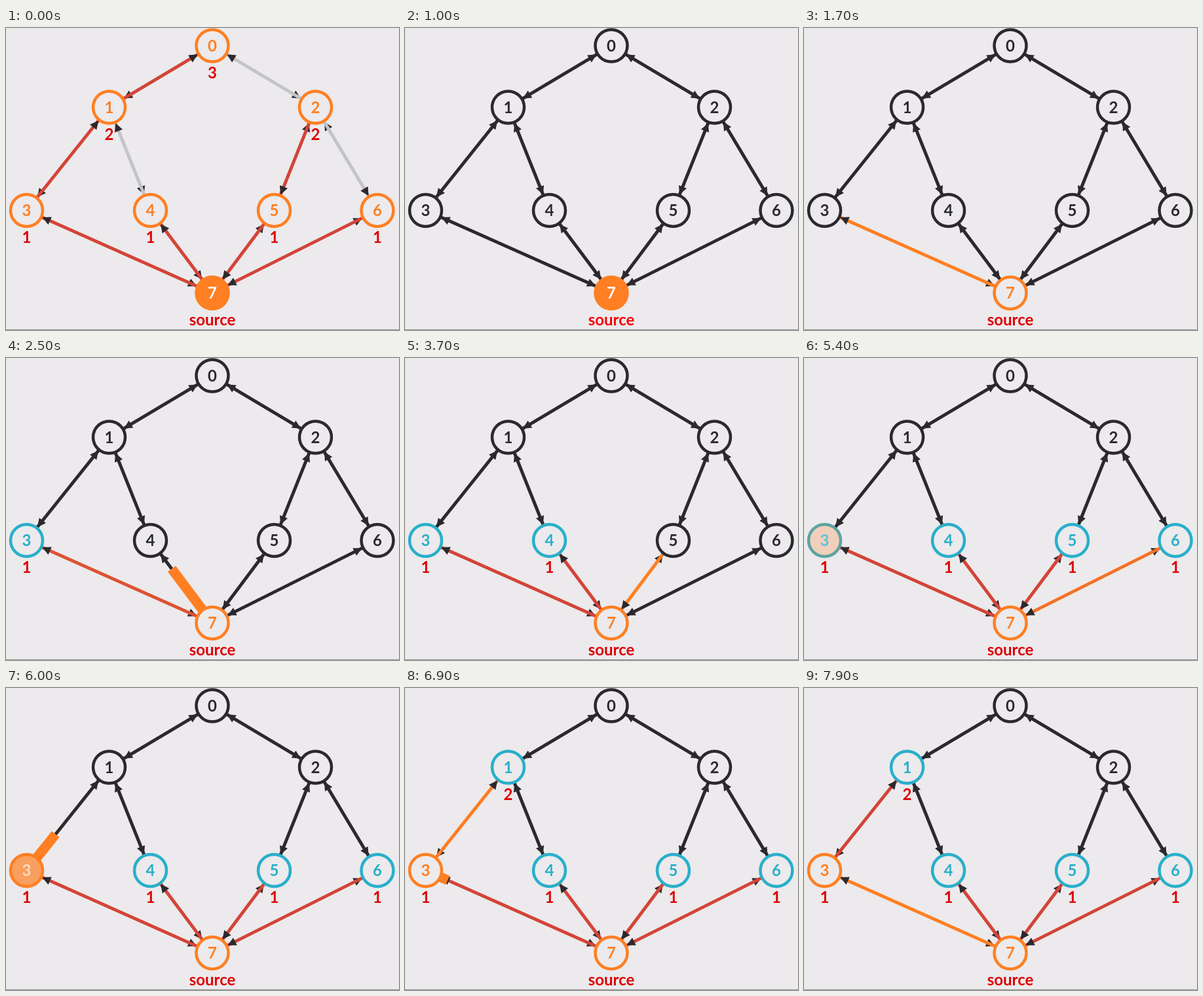
These frames come from a looping animation (600x461 px, 8 s). An HTML page with a canvas:

```html
<!DOCTYPE html>
<html lang="en">
<head>
<meta charset="utf-8">
<title>Breadth-first search</title>
<style>
  html, body { margin: 0; width: 100%; height: 100%; overflow: hidden; background: #eceaec; }
  canvas { display: block; width: 600px; height: 461px; }
</style>
</head>
<body>
<canvas id="stage"></canvas>
<script>
const LOOP = 8000, STEP = 498, RIM = 26;
const BG = [236, 234, 236, 1], INK = [43, 41, 45, 1], ORANGE = [255, 127, 34, 1],
      BLUE = [41, 175, 203, 1], RED = [211, 68, 56, 1], GREY = [196, 195, 197, 1],
      WHITE = [255, 255, 255, 1], LABEL = [222, 0, 4, 1], BRIGHT = [250, 0, 6, 1],
      CLEAR = [222, 0, 4, 0];
const RESET = 350, RESET_TIME = 250;

const canvas = document.getElementById("stage"), ctx = canvas.getContext("2d");
const ratio = window.devicePixelRatio || 1;
canvas.width = 600 * ratio;
canvas.height = 461 * ratio;

// A track is a start colour followed by timed fades.
const track = color => [{ at: 0, time: 0, color }];
const fade = (tr, at, color, time = STEP) => tr.push({ at, time, color });

const nodes = [[315, 27, "3"], [157.5, 121, "2"], [472.5, 121, "2"], [31.5, 278.5, "1"],
  [220.5, 278.5, "1"], [409.5, 278.5, "1"], [567, 278.5, "1"], [315, 404.5, "source"]]
  .map(([x, y, label], id) => {
    const start = id === 7;
    const n = { id, x, y, label, ring: track(ORANGE), fill: track(start ? ORANGE : BG),
      text: track(start ? WHITE : ORANGE), note: track(LABEL) };
    if (!start) {
      fade(n.ring, RESET, INK, RESET_TIME);
      fade(n.text, RESET, INK, RESET_TIME);
    }
    fade(n.note, RESET, start ? BRIGHT : CLEAR, RESET_TIME);
    return n;
  });

// The head at the second node lies above the line, the other below it.
const edges = [[1, 0], [2, 0, GREY], [3, 1], [4, 1, GREY], [2, 5], [2, 6, GREY],
  [7, 3], [7, 4], [5, 7], [6, 7]].map(([a, b, color = RED]) => {
    const e = { a, b, line: track(color) };
    fade(e.line, RESET, INK, RESET_TIME);
    return e;
  });
const edgeOf = (a, b) => edges.find(e => (e.a === a && e.b === b) || (e.a === b && e.b === a));

const sweeps = [];
function sweep(at, from, to) {
  sweeps.push({ at, from, to });
  fade(edgeOf(from, to).line, at + STEP, ORANGE, 0);
}
function discover(at, from, to) {
  sweep(at, from, to);
  const n = nodes[to];
  fade(n.ring, at + 500, BLUE);
  fade(n.text, at + 500, BLUE);
  fade(n.note, at + 500, LABEL);
  fade(edgeOf(from, to).line, at + 1001, RED);
}
function open(at, id) {
  fade(nodes[id].fill, at, BG);
  fade(nodes[id].text, at, ORANGE);
}

open(1195, 7);
fade(nodes[7].note, 1195, LABEL);
discover(1195, 7, 3);
discover(2205, 7, 4);
discover(3201, 7, 5);
discover(4204, 7, 6);
fade(nodes[3].ring, 5205, ORANGE);
fade(nodes[3].fill, 5205, ORANGE);
fade(nodes[3].text, 5205, WHITE);
open(5791, 3);
discover(5791, 3, 1);
sweep(6792, 3, 7);

const ease = p => p < .5 ? 4 * p ** 3 : 1 - 4 * (1 - p) ** 3;

function colorAt(tr, t) {
  let c = tr[0].color;
  for (const { at, time, color } of tr) {
    if (t < at) break;
    const p = time ? ease(Math.min(1, (t - at) / time)) : 1;
    c = c.map((v, i) => v + (color[i] - v) * p);
  }
  return `rgba(${c.map((v, i) => i < 3 ? Math.round(v) : v).join()})`;
}

// Point at a distance from node a towards node b.
function along(a, b, d) {
  const k = d / Math.hypot(b.x - a.x, b.y - a.y);
  return [a.x + (b.x - a.x) * k, a.y + (b.y - a.y) * k];
}

function line(p, q, width, color) {
  ctx.beginPath();
  ctx.moveTo(...p);
  ctx.lineTo(...q);
  ctx.lineWidth = width;
  ctx.strokeStyle = color;
  ctx.stroke();
}

function head(from, to) {
  ctx.save();
  ctx.translate(...along(to, from, RIM));
  ctx.rotate(Math.atan2(to.y - from.y, to.x - from.x));
  ctx.beginPath();
  ctx.moveTo(0, 0);
  ctx.lineTo(-13, -6.5);
  ctx.lineTo(-13, 6.5);
  ctx.fillStyle = `rgba(${INK})`;
  ctx.fill();
  ctx.restore();
}

function write(text, x, y, color) {
  ctx.fillStyle = color;
  ctx.fillText(text, x, y);
}

function draw(t) {
  ctx.setTransform(ratio, 0, 0, ratio, 0, 0);
  ctx.fillStyle = `rgba(${BG})`;
  ctx.fillRect(0, 0, 600, 461);
  ctx.fillStyle = "#8c8b8d";
  ctx.fillRect(0, 460, 600, 1);
  ctx.font = "bold 24px Lato, 'Open Sans', sans-serif";
  ctx.textAlign = "center";

  for (const e of edges) {
    const a = nodes[e.a], b = nodes[e.b];
    head(b, a);
    line(along(a, b, RIM), along(b, a, RIM), 5, colorAt(e.line, t));
    head(a, b);
  }
  for (const s of sweeps) {
    const p = (t - s.at) / STEP;
    if (p <= 0 || p >= 1) continue;
    const a = nodes[s.from], b = nodes[s.to];
    const span = Math.hypot(b.x - a.x, b.y - a.y) - 2 * RIM;
    line(along(a, b, RIM - 3), along(a, b, RIM + span * ease(p)), 15, `rgba(${ORANGE})`);
  }
  for (const n of nodes) {
    ctx.beginPath();
    ctx.arc(n.x, n.y, 24.5, 0, 2 * Math.PI);
    ctx.fillStyle = colorAt(n.fill, t);
    ctx.fill();
    ctx.lineWidth = 4.5;
    ctx.strokeStyle = colorAt(n.ring, t);
    ctx.stroke();
    write(n.id, n.x, n.y + 8.5, colorAt(n.text, t));
    write(n.label, n.x, n.y + 49.5, colorAt(n.note, t));
  }
}

function tick(now) {
  draw(now % LOOP);
  requestAnimationFrame(tick);
}
requestAnimationFrame(tick);
</script>
</body>
</html>
```
